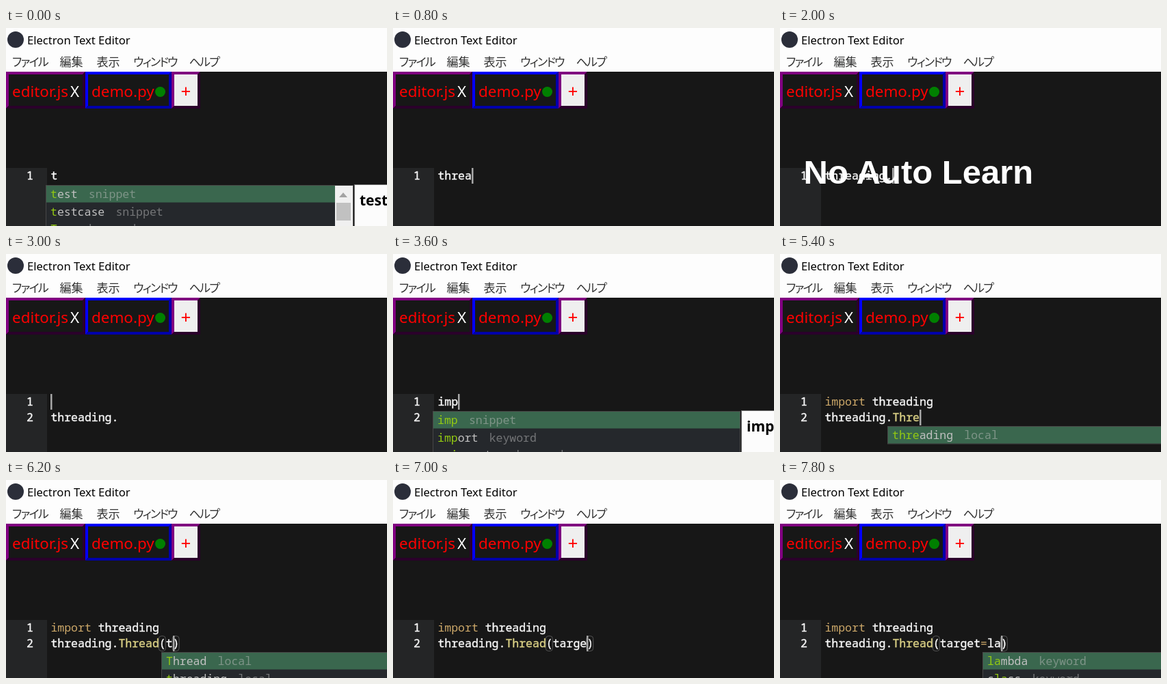
Write an HTML page that moves like this. It is 557 px wide and 290 px high and loops after 8 s.

```html
<!DOCTYPE html>
<html lang="ja">
<meta charset="utf-8">
<style>
html, body { margin: 0; width: 100%; height: 100%; overflow: hidden; background: #171717; }
svg { display: block; }
text { white-space: pre; font-family: "Noto Sans", sans-serif; }
.code text { font: 16.5px "Noto Sans Mono", monospace; fill: #f8f8f8; }
.code .src { stroke: #f8f8f8; stroke-width: .4px; }
.code .item { fill: #c1c1c1; }
.code .doc { font: bold 21px "Noto Sans", sans-serif; fill: #000; }
.menu text { font: 17px "Noto Sans CJK JP", sans-serif; font-feature-settings: "palt"; fill: #333; }
.menu .kana { letter-spacing: -1.7px; }
.tabs text { font-size: 22.4px; fill: #f00; }
.hit { fill: #93ca12; }
.key { fill: #cda869; stroke: none; }
.fn { fill: #dad085; stroke: #dad085; }
#caption { font: bold 49px "Liberation Sans", Arial, sans-serif; fill: #fff; }
</style>
<svg width="557" height="290" viewBox="0 0 557 290">
  <rect width="557" height="290" fill="#171717"/>
  <rect width="557" height="64" fill="#fdfdfd"/>
  <circle cx="14" cy="17" r="12" fill="#2b2e3a"/>
  <text x="31" y="23.5" font-size="16.6">Electron Text Editor</text>
  <g class="menu">
    <text class="kana" x="9" y="56">ファイル</text>
    <text x="78.5" y="56">編集</text>
    <text x="132.5" y="56">表示</text>
    <text class="kana" x="186" y="56">ウィンドウ</text>
    <text class="kana" x="267.5" y="56">ヘルプ</text>
  </g>
  <g class="tabs">
    <g id="frames"></g>
    <text x="9" y="101">editor.js</text>
    <text x="94" y="101" style="fill:#fff">X</text>
    <text x="125" y="101">demo.py</text>
    <circle cx="225.5" cy="93.5" r="7.5" fill="green"/>
    <text x="263" y="102" text-anchor="middle" style="font-size:26px">+</text>
  </g>
  <rect y="205" width="60" height="85" fill="#242526"/>
  <g class="code" id="code"></g>
  <text id="caption" x="34.5" y="228">No Auto Learn</text>
</svg>
<script>
const STEP = 200, STEPS = 40, CHAR = 9.9, LEFT = 65.4, ROW = 25.5;
const $ = id => document.getElementById(id);
const rect = (x, y, w, h, fill, more = '') =>
  `<rect x="${x}" y="${y}" width="${w}" height="${h}" fill="${fill}" ${more}/>`;
const text = (x, y, s, cls = 'src') => `<text x="${x}" y="${y}" class="${cls}">${s}</text>`;
const span = (cls, s) => `<tspan class="${cls}">${s}</tspan>`;
const colX = col => LEFT + col * CHAR;

// Bevelled 4px tab border
const bevel = (x, w, light, dark) => `
  <path fill="${light}" d="M${x} 64h${w}l-4 4h${8 - w}v46l-4 4z"/>
  <path fill="${dark}" d="M${x + w} 64v54h${-w}l4 -4h${w - 8}v-46z"/>`;
$('frames').innerHTML = bevel(0, 116, '#800080', '#2b002b') +
  bevel(116, 126, '#00f', '#0000ab') +
  rect(246, 68, 34, 46, '#efefef') + bevel(242, 42, '#800080', '#2b002b');

const words = {
  start: 'test snippet,testcase snippet,True keyword,with keyword',
  imp: 'imp snippet,import keyword,__import__ keyword,if keyword,in keyword,is keyword',
  module: 'threading local,test snippet,testcase snippet,True keyword',
  member: 'threading local',
  arg: 'Thread local,threading local,test snippet,testcase snippet',
  value: 'lambda keyword,else keyword,class keyword'
};

// Marks the typed letters in order; null if the word does not match
function mark(word, typed) {
  let i = 0;
  const out = [...word].map(c =>
    i < typed.length && c.toLowerCase() === typed[i].toLowerCase() ? (i++, span('hit', c)) : c);
  return i === typed.length ? out.join('') : null;
}

function popup(list, typed, col, line) {
  if (!typed) return '';
  const rows = words[list].split(',').map(w => w.split(' '))
    .filter(([word]) => mark(word, typed));
  if (!rows.length) return '';
  const x = Math.round(colX(col)) - 7, y = line === 1 ? 230 : 252;
  const h = rows.length * ROW + 1, bar = rows.length > 3;
  let s = rect(x + .5, y + .5, 449, h - 1, '#25282c', 'stroke="#484747"') +
    rect(x + 1, y + 1, bar ? 422 : 448, ROW - 1, '#3a674e');
  rows.forEach(([word, kind], i) => {
    const by = y + 19 + i * ROW;
    s += text(x + 7, by, mark(word, typed), 'item') +
      `<g opacity=".5">${text(x + 23.2 + word.length * CHAR, by, kind, 'item')}</g>`;
  });
  if (bar) s += rect(x + 423, y + 1, 26, h - 2, '#f0f0f0') +
    rect(x + 425, y + 26, 21, 26, '#c1c1c1') +
    `<path d="M${x + 429} ${y + 18}h12l-6 -7z" fill="#a3a3a3"/>`;
  if (rows[0][1] === 'snippet' && col === 0)
    s += rect(509.5, 229.5, 60, 70, '#fcfcfc', 'stroke="#777"') + text(517, 260, rows[0][0], 'doc');
  return s;
}

function draw(n) {
  let one, two = '', line = 1, cursor, menu = '', marks = '';
  const later = n >= 15;
  if (!later) {
    one = 'threading.'.slice(0, n + 1);
    cursor = one.length;
    if (n < 9) menu = popup('start', one, 0, 1);
  } else {
    one = n < 24 ? 'import t'.slice(0, n - 15) : 'import threading';
    cursor = one.length;
    if (n < 22) menu = popup('imp', one, 0, 1);
    if (n === 23) menu = popup('module', 't', 7, 1);
    one = one.replace('import', span('key', 'import'));
    two = 'threading.';
    if (n > 24) {
      line = 2;
      const name = 'Thread'.slice(0, n - 23);
      const arg = n < 30 ? '' : 'target=la'.slice(0, n - 30);
      two += span('fn', name);
      cursor = 10 + name.length;
      if (n < 30) menu = popup('member', name, 10, 2);
      else {
        two += `(${arg.replace('=', span('key', '='))})`;
        cursor = 17 + arg.length;
        menu = n < 37 ? popup('arg', arg, 17, 2) : popup('value', arg.slice(7), 24, 2);
        marks = [16, cursor].map(c =>
          rect(colX(c) - .5, 228.5, 10, 22, 'none', 'rx="4" stroke="#555"')).join('');
      }
    }
  }
  const caret = n === 0 || n === 23 ? '' :
    rect(Math.round(colX(cursor)), line === 1 ? 205 : 228, 2.5, 23, '#a7a7a7');
  $('code').innerHTML = text(30, 222, '1') + (later ? text(30, 245, '2') : '') + marks +
    text(LEFT, 222, one) + text(LEFT, 245, two) + caret + menu;
  $('caption').style.display = n >= 10 && !later ? '' : 'none';
}

let last = -1;
function tick() {
  const n = Math.floor(performance.now() / STEP) % STEPS;
  if (n !== last) draw(last = n);
  requestAnimationFrame(tick);
}
tick();
</script>
</html>
```
